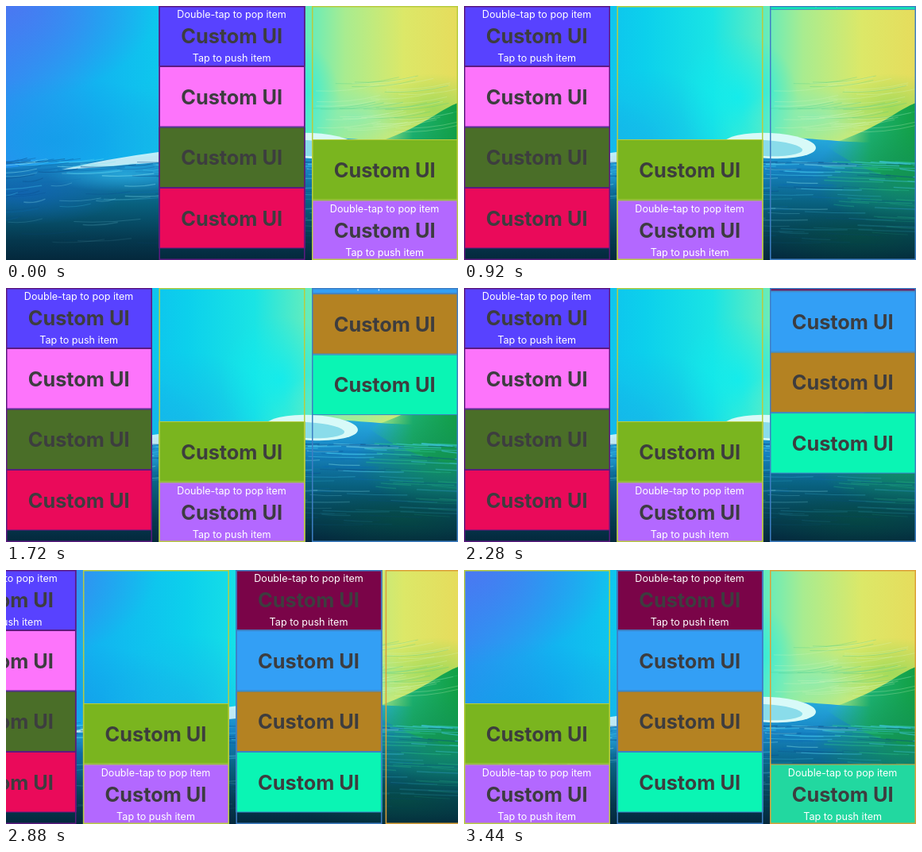
These frames come from a looping animation (569x320 px, 3.48 s). An HTML page with a canvas:

```html
<!DOCTYPE html>
<html lang="en">
<head>
<meta charset="utf-8">
<style>
  html, body { margin: 0; width: 100%; height: 100%; overflow: hidden; background: #04283c; }
  canvas { display: block; width: 569px; height: 320px; }
</style>
</head>
<body>
<canvas id="stage" width="569" height="320"></canvas>
<script>
const W = 569, H = 320, LOOP = 3480;
const COL_W = 184, COL_STEP = 192.5, ITEM_H = 75.5, ITEM_STEP = 76.5;
const SLIDES = [309, 2672], SLIDE_MS = 420, PUSH_MS = 200;

const ctx = document.getElementById('stage').getContext('2d');

// Columns: resting slot, slide that brings it in, border, edge, items as [color, push time].
const columns = [
  { slot: 1, border: '#5c1a80', items: [['#ea0a5a'], ['#4a6e28'], ['#fd74fb'], ['#5842ff']] },
  { slot: 2, border: '#b8cc40', bottom: true, items: [['#7ab51f'], ['#b368ff']] },
  { slot: 3, enter: 0, border: '#3f7fc4',
    items: [['#0af5b4', 889], ['#b48222', 1240], ['#339ff5', 1682], ['#7a0448', 2251]] },
  { slot: 4, enter: 1, border: '#dca038', bottom: true, items: [['#22d8a0', 3241]] }
];

function ease(t, start, length) {
  const p = Math.min(1, Math.max(0, (t - start) / length));
  return p * p * (3 - 2 * p);
}

function paintWave() {
  const canvas = document.createElement('canvas');
  canvas.width = W;
  canvas.height = H;
  const g = canvas.getContext('2d');
  let seed = 7;
  const random = () => (seed = seed * 16807 % 2147483647) / 2147483647;

  function gradient(x, y, stops) {
    const fill = g.createLinearGradient(0, 0, x, y);
    stops.forEach(([at, color]) => fill.addColorStop(at, color));
    return fill;
  }
  function glow(x, y, rx, ry, color) {
    g.save();
    g.translate(x, y);
    g.scale(rx, ry);
    const fill = g.createRadialGradient(0, 0, 0, 0, 0, 1);
    fill.addColorStop(0, color);
    fill.addColorStop(1, color.slice(0, 7) + '00');
    g.fillStyle = fill;
    g.fillRect(-1, -1, 2, 2);
    g.restore();
  }
  function shape(path, fill) {
    g.fillStyle = fill;
    g.fill(new Path2D(path));
  }
  function streak(x, y, length, bend, rise) {
    g.beginPath();
    g.moveTo(x, y);
    g.quadraticCurveTo(x + length / 2, y + bend, x + length, y + rise);
    g.stroke();
  }

  // Sky
  g.fillStyle = gradient(W, 0, [[0, '#2f90f2'], [.2, '#12b4f0'], [.4, '#0cd0ec'],
    [.55, '#1ae4e4'], [.66, '#5eecc0'], [.75, '#a8ec90'], [.88, '#dce868'], [1, '#e6dc5c']]);
  g.fillRect(0, 0, W, H);
  glow(0, 0, 190, 120, '#4a78f2');
  glow(60, 170, 190, 80, '#129ce8c0');
  glow(230, 170, 110, 90, '#18b4e8b0');
  glow(345, 115, 75, 80, '#0cecf0d0');
  glow(440, 140, 90, 40, '#7cecc0a0');
  glow(540, 130, 80, 45, '#8cd858c0');

  // Water
  shape('M0 204 C60 198 110 196 192 188 C270 180 330 164 390 165 C450 166 490 176 569 170 V320 H0Z',
    gradient(0, H, [[.5, '#28b0e0'], [.64, '#1784c4'], [.78, '#08607e'], [.92, '#05384e'], [1, '#04283c']]));
  glow(20, 236, 130, 40, '#1262b8c0');
  glow(150, 212, 100, 22, '#2cb4e4b0');

  // Green crest on the right
  shape('M569 122 C550 129 530 146 502 158 Q480 168 455 176 Q510 215 569 222Z',
    gradient(W, 0, [[.8, '#30c8a000'], [.9, '#1cb070'], [1, '#12a044']]));
  glow(560, 215, 120, 65, '#129454');
  glow(500, 290, 140, 40, '#05503ea0');

  // Foam
  shape('M70 206 Q130 192 192 184 L300 170 L300 186 L192 197 Q150 200 120 203Z', '#dcf8fcd8');
  g.fillStyle = '#d8faf8';
  g.beginPath();
  g.ellipse(385, 176, 58, 16, .05, 0, 7);
  g.fill();
  g.fillStyle = '#8adcea';
  g.beginPath();
  g.ellipse(378, 179, 48, 10, .05, 0, 7);
  g.fill();

  // Ripples spreading along the water, and arcs over the crest
  const tints = ['#46ccf0', '#0c6cb0', '#0a4a88', '#8ae4f0'];
  for (let i = 0; i < 260; i++) {
    const x = random() * (W + 60) - 60, y = 196 + 108 * random() ** 2;
    g.globalAlpha = .5 * (1 - (y - 195) / 120);
    g.strokeStyle = x > 440 && i % 2 ? '#2cc48c' : tints[i % 4];
    g.lineWidth = .6 + random();
    streak(x, y, 25 + 60 * random(), 2, (x - 300) / 70);
  }
  g.lineWidth = .8;
  g.globalAlpha = .35;
  for (let i = 0; i < 36; i++) {
    g.strokeStyle = i % 3 ? '#d8f8c0' : '#3cc890';
    streak(385 + 110 * random(), 95 + 65 * random(), 80, 2, -8);
  }
  return canvas;
}

function drawText(text, x, y, font, color) {
  ctx.font = font + ' Inter, sans-serif';
  ctx.fillStyle = color;
  ctx.fillText(text, x, y);
}

function drawItem(x, y, color, border, active) {
  const mid = x + COL_W / 2 - .4;
  ctx.fillStyle = color;
  ctx.fillRect(x, y, COL_W, ITEM_H);
  ctx.strokeStyle = border;
  ctx.lineWidth = 1;
  ctx.strokeRect(x + .5, y, COL_W - 1, ITEM_H);
  drawText('Custom UI', mid, y + 47.2, 'bold 25.3px', '#3d3d3f');
  if (!active) return;
  drawText('Double-tap to pop item', mid, y + 14.9, '12.6px', '#fff');
  drawText('Tap to push item', mid, y + 69.9, '12.6px', '#fff');
}

function drawColumn(column, t, slides) {
  const { slot, enter, border, bottom, items } = column;
  if (enter !== undefined && slides[enter] === 0) return;
  // A new column starts at the stage edge; the others move by whole slots.
  let x = (slot - slides[0] - slides[1]) * COL_STEP;
  if (enter !== undefined && slides[enter] < 1) x = W - COL_W * slides[enter];

  let depth = -1;
  for (let i = items.length - 1; i >= 0; i--) {
    const [color, start = -PUSH_MS] = items[i];
    if (t <= start) continue;
    const active = depth === -1;
    depth += ease(t, start, PUSH_MS);
    const y = depth * ITEM_STEP;
    drawItem(x, bottom ? H - ITEM_H - y + .5 : y, color, border, active);
  }
  ctx.strokeStyle = border;
  ctx.lineWidth = 1.5;
  ctx.strokeRect(x + .75, .75, COL_W - 1.5, H - 1.5);
}

const wave = paintWave();
ctx.textAlign = 'center';

function frame() {
  const t = performance.now() % LOOP;
  const slides = SLIDES.map(start => ease(t, start, SLIDE_MS));
  ctx.drawImage(wave, 0, 0);
  columns.forEach(column => drawColumn(column, t, slides));
  requestAnimationFrame(frame);
}
frame();
</script>
</body>
</html>
```
